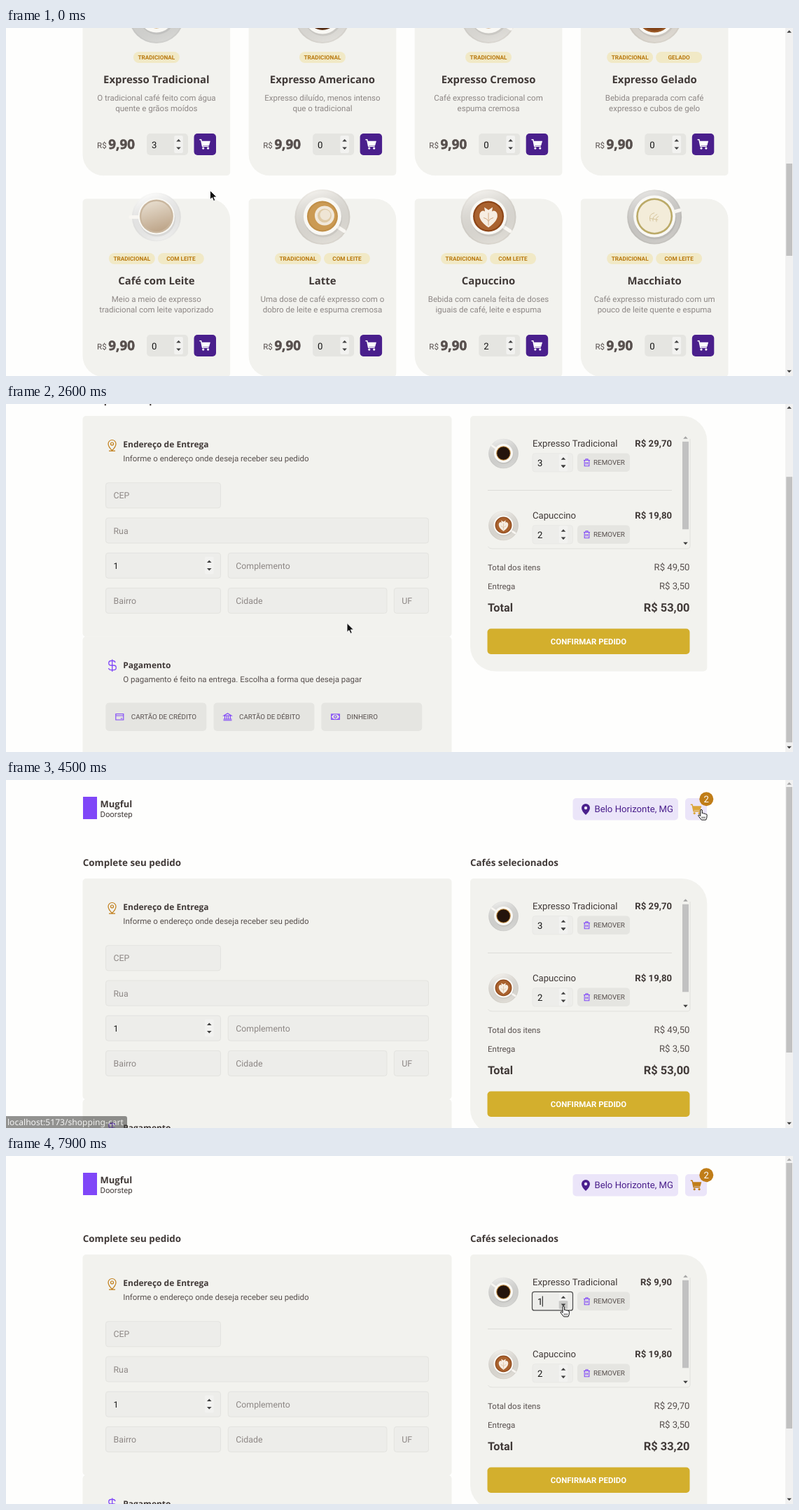
An HTML page for the animation above (8000 ms loop, 1124x498 px).

```html
<!DOCTYPE html>
<html lang="pt-BR">
<head>
<meta charset="utf-8">
<style>
html, body { margin: 0; width: 100%; height: 100%; overflow: hidden; background: #fefefd; }
svg { display: block; width: 1124px; height: 498px; font-family: Roboto, sans-serif; }
text { white-space: pre; text-rendering: geometricPrecision; }
.h { font-family: 'Open Sans', sans-serif; font-weight: 700; }
.x { stroke: currentColor; stroke-width: .6px; color: #574f4d; }
.b { font-weight: 700; }
.m { text-anchor: middle; }
.e { text-anchor: end; }
</style>
</head>
<body>
<svg id="stage" viewBox="0 0 1124 498"></svg>
<script>
const PURPLE = '#4a1f8c', VIOLET = '#8047f8', GOLD = '#c07d18', PANEL = '#f2f2ee',
      FIELD = '#ededea', BUTTON = '#e5e5e1', DARK = '#403937', TEXT = '#574f4d', LABEL = '#8d8785';

// Drawing helpers, each returns markup
const text = (x, y, str, size, fill, cls = '', id = '') =>
  `<text x="${x}" y="${y}" font-size="${size}" fill="${fill}" class="${cls}" id="${id}">${str}</text>`;
const rect = (x, y, w, h, fill, r = 5, more = '') =>
  `<rect x="${x}" y="${y}" width="${w}" height="${h}" rx="${r}" fill="${fill}" ${more}/>`;
const circle = (x, y, r, fill) => `<circle cx="${x}" cy="${y}" r="${r}" fill="${fill}"/>`;
const at = (x, y, body, more = '') => `<g transform="translate(${x} ${y})" ${more}>${body}</g>`;
const line = (d, color, w = 1.1) => `<path d="${d}" fill="none" stroke="${color}" stroke-width="${w}"/>`;
const gradient = (id, a, b) => `<linearGradient id="${id}" x1=".35" x2=".65" y2="1">
  <stop stop-color="${a}"/><stop offset="1" stop-color="${b}"/></linearGradient>`;

const leaf = (w, h, R, more = '') => `<path fill="${PANEL}" ${more} d="M5 0H${w - R}a${R} ${R} 0 0 1 ${R} ${R}V${h - 5}a5 5 0 0 1-5 5H${R}a${R} ${R} 0 0 1-${R}-${R}V5a5 5 0 0 1 5-5z"/>`;
const arrow = (x, y, dir, fill = '#404040', more = '') =>
  `<path d="M${x - 3.3} ${y - dir * 1.8}h6.6l-3.3 ${dir * 3.6}z" fill="${fill}" ${more}/>`;
const spinner = (x, y) => rect(x - 6.3, y - 12.5, 12.6, 25, '#f2f2f0', 2) + arrow(x, y - 5.7, -1) + arrow(x, y + 5.7, 1);
const cartIcon = (x, y, color, id = '') => at(x, y,
  `<path d="M.3 1.2h2.3l2 9.6h9" fill="none" stroke="currentColor" stroke-width="1.5" stroke-linejoin="round"/>
   <path d="M3 3.2h12.8l-1.7 6.3H4.3z" fill="currentColor"/>` +
  circle(5.7, 13.6, 1.6, 'currentColor') + circle(12.6, 13.6, 1.6, 'currentColor'), `color="${color}" id="${id}"`);

// Cups seen from above: plate radius, plate, edge, cup radius, coffee radius, rim, middle, handle angle, foam
const heart = '<path d="M0 15Q-16 4-12-6q3-5 7-2l-1-6 6 4 6-4-1 6q4-3 7 2Q16 4 0 15z" fill="#f6ede2"/>' +
  line('M0 12V-6M-7 1q5 1 7 5 2-4 7-5', '#d3ab86', 1);
const foam = circle(3, -2, 14, '#f1e8da') + circle(3, -2, 10, '#dfcaa6') + circle(4, -3, 7.5, '#efe5d5');
const swirl = line('M-6 6Q-9-4 0-6M-2 6Q-4 0 4-4M3 7Q1 1 6-1M-6 2l11 2', '#d6c59c', 1);
const CUPS = {
  black: [39.5, '#e4e4e1', '#dcdcd9', 25, 19, '#b98236', '#24140c', 215, ''],
  long: [39.5, '#eeece7', '#e6e3dd', 27, 21.5, '#5f3318', '#3a1f11', 160, ''],
  cream: [39.5, '#eeece7', '#e6e3dd', 26, 19, '#b27a40', '#c8955a', 30, ''],
  iced: [39.5, '#ede8e0', '#e4dfd6', 29, 25, '#9a5a28', '#824319', 330, ''],
  milk: [35, '#fdfdfc', '#f8f8f6', 26, 24, '#c9b69e', 'url(#milk)', 180, ''],
  latte: [39.5, '#eeebe4', '#e6e2da', 27, 22, '#c08f48', '#cb9a53', 33, foam],
  heart: [39.5, '#eeebe4', '#e6e2da', 26, 22, '#8d4517', '#a9622f', 33, heart],
  macchiato: [39, '#dad8d4', '#d1cfca', 30, 26, '#bbaa68', '#f3ecd9', 345, swirl],
};
const cup = (x, y, kind, s = 1) => {
  const [pr, plate, edge, cr, kr, rim, mid, angle, art] = CUPS[kind];
  return at(x, y, `<g transform="scale(${s})">` + circle(0, 0, pr, edge) + circle(0, 0, pr - 2, plate) +
    circle(0, 0, pr, 'url(#shade)') +
    `<path d="M18 0H37" stroke="#f8f6f2" stroke-width="5" stroke-linecap="round" transform="rotate(${angle})"/>` +
    circle(1, 2, cr, '#00000012') + circle(0, -1, cr, '#f9f8f4') + circle(0, -1, kr, rim) +
    circle(0, -1, kr * .9, mid) + art + '</g>');
};

const pill = (x, str) => rect(x, 77.5, 66, 16, '#f1e9c6', 8) + text(x + 33, 88.5, str, 8.23, '#b9790f', 'b m');
function card(i, [name, kind, a, b, tag, qty = 0]) {
  const x = 109.5 + i % 4 * 237.1, y = i < 4 ? -43.5 : 244.5, c = 105.35, first = i ? '' : 'hot';
  return at(x, y, `<g id="${first}">` + leaf(210.7, 254.7, 30, `id="${first}Bg"`) + cup(c, 26, kind) +
    (tag ? pill(c - 68, 'TRADICIONAL') + pill(c + 2, tag) : pill(c - 33, 'TRADICIONAL')) +
    text(c, 122, name, 14.9, DARK, 'h m') + text(c, 147.2, a, 11.52, LABEL, 'm') + text(c, 162.2, b, 11.52, LABEL, 'm') +
    text(20.6, 215.7, 'R$', 11.52, TEXT) + text(36.8, 216.5, '9,90', 18.8, TEXT, 'h x') +
    rect(91.5, 194.5, 59, 31, BUTTON) + text(98.5, 215, qty, 13.17, '#151515') + spinner(137, 210) +
    rect(159, 194.5, 31.5, 31, PURPLE, 5, `id="${first}Buy"`) + cartIcon(166.5, 202, '#fff') + '</g>');
}
const MENU = [
  ['Expresso Tradicional', 'black', 'O tradicional café feito com água', 'quente e grãos moídos', '', 3],
  ['Expresso Americano', 'long', 'Expresso diluído, menos intenso', 'que o tradicional'],
  ['Expresso Cremoso', 'cream', 'Café expresso tradicional com', 'espuma cremosa'],
  ['Expresso Gelado', 'iced', 'Bebida preparada com café', 'expresso e cubos de gelo', 'GELADO'],
  ['Café com Leite', 'milk', 'Meio a meio de expresso', 'tradicional com leite vaporizado', 'COM LEITE'],
  ['Latte', 'latte', 'Uma dose de café expresso com o', 'dobro de leite e espuma cremosa', 'COM LEITE'],
  ['Capuccino', 'heart', 'Bebida com canela feita de doses', 'iguais de café, leite e espuma', 'COM LEITE', 2],
  ['Macchiato', 'macchiato', 'Café expresso misturado com um', 'pouco de leite quente e espuma', 'COM LEITE'],
];

const field = (x, y, w, str, color = LABEL) =>
  rect(x, y, w, 36, FIELD, 3.5, 'stroke="#e3e3df"') + text(x + 11, y + 22.6, str, 12.34, color);
const section = (y, title, note) => text(167.3, y, title, 12, DARK, 'h') + text(167.3, y + 19.8, note, 11.52, TEXT);
const pay = (x, str, icon) => rect(x, 551.5, 144, 40.5, BUTTON) + at(x + 14, 566, line(icon, VIOLET)) +
  text(x + 36.5, 574.7, str, 9.8, TEXT);
const trash = line('M0 2.5h9M3 2.3V.7h3v1.6M1.2 2.5v8.3h6.6V2.5M3.4 5v3.6M5.6 5v3.6', VIOLET);

function item(y, name, kind, qty, price, id) {
  return at(0, y, cup(710.5, 195, kind, .54) + text(752, 184.6, name, 13.17, DARK) +
    text(951, 184.6, price, 13.17, DARK, 'b e', id && 'price') +
    rect(752, 194.7, 57.5, 26.3, FIELD, 3.5, 'stroke="#e6e6e2" stroke-width=".8"') + spinner(796, 207.7) +
    (id ? rect(789.7, 207.2, 12.6, 11.6, '#c9c9c7', 1, 'id="down"') + arrow(796, 213.4, 1) +
      rect(751.5, 194.3, 58, 26.6, 'none', 3, 'id="focus" stroke="#4a4a4a" stroke-width="1.2"') +
      rect(765.8, 200.5, 1, 15, '#111', 0, 'id="caret"') : '') +
    text(759, 212.5, qty, 13.17, '#151515', '', id) +
    rect(816, 194.5, 75, 26.5, BUTTON) + at(825, 202, trash) + text(839, 211.2, 'REMOVER', 9.87, TEXT));
}

const home = MENU.map((m, i) => card(i, m)).join('');
const cart =
  rect(110, 24, 20, 32, VIOLET, 0) + text(134.5, 39, 'Mugful', 13, DARK, 'h') + text(134.5, 53, 'Doorstep', 11.3, DARK) +
  rect(809.5, 26, 150.5, 31.5, '#ebe5f9') +
  `<path d="M828 34a6 6 0 0 1 6 6q0 4.5-6 10-6-5.5-6-10a6 6 0 0 1 6-6z" fill="${PURPLE}"/>` + circle(828, 40, 2.2, '#ebe5f9') +
  text(840.5, 46.2, 'Belo Horizonte, MG', 13.17, PURPLE) +
  rect(970, 26, 31, 31.5, '#ebe5f9') + cartIcon(977.5, 34, GOLD, 'basket') +
  circle(1000.3, 27.3, 10, GOLD) + text(1000.3, 32, '2', 13.17, '#fff', 'm') +
  text(109.8, 122.8, 'Complete seu pedido', 13.4, DARK, 'h') + text(663, 122.8, 'Cafés selecionados', 13.4, DARK, 'h') +
  rect(109.5, 141, 527, 316.2, PANEL) + rect(109.5, 456.8, 527, 190, PANEL) +
  line('M151.5 190.5q-5.5-5.5-5.5-9.5a5.5 5.5 0 0 1 11 0q0 4-5.5 9.5zM147 191.2h9', GOLD, 1.2) +
  `<circle cx="151.5" cy="181" r="2" fill="none" stroke="${GOLD}" stroke-width="1.2"/>` +
  section(186.4, 'Endereço de Entrega', 'Informe o endereço onde deseja receber seu pedido') +
  field(142.5, 236.8, 164, 'CEP') + field(142.5, 287, 461, 'Rua') +
  field(142.5, 337.2, 164, '1', '#151515') + spinner(290.3, 355) + field(317.3, 337.2, 286.2, 'Complemento') +
  field(142.5, 387.4, 164, 'Bairro') + field(317.3, 387.4, 226.7, 'Cidade') + field(554.3, 387.4, 49.2, 'UF') +
  line('M156 494q-.5-2.5-3-2.5h-3a3 3 0 0 0 0 6.5h4a3.3 3.3 0 0 1 0 6.6h-4q-3 0-3.5-2.6M151.7 489.5v17.5', VIOLET, 1.3) +
  section(501.8, 'Pagamento', 'O pagamento é feito na entrega. Escolha a forma que deseja pagar') +
  pay(142.3, 'CARTÃO DE CRÉDITO', 'M.5 1.5h11v8.5h-11zM.5 4h11M7.5 8h2.5') +
  pay(296.5, 'CARTÃO DE DÉBITO', 'M.5 4L6 .7 11.5 4zM2 4v5M4.7 4v5M7.3 4v5M10 4v5M0 9h12M0 10.7h12') +
  pay(450.3, 'DINHEIRO', 'M.3 1.7h11.8v7.8H.3zM.3 4.5l3-2.8M9 1.7l3 2.8M.3 6.7l3 2.8M9 9.5l3-2.8M4.3 5.6a1.8 1.8 0 1 0 3.6 0a1.8 1.8 0 1 0-3.6 0') +
  at(663, 141, leaf(338.3, 365.5, 36)) +
  line('M688.5 328q1 3 6 3h278q4.5 0 4.5-4V174', '#dededa', .9) +
  item(0, 'Expresso Tradicional', 'black', 3, '', 'qty') + item(103, 'Capuccino', 'heart', 2, 'R$ 19,80', '') +
  rect(688, 247, 263, 1, '#dddcd8', 0) +
  rect(966, 177.8, 9, 125.5, '#c1c1c1', 0) + arrow(970.5, 172, -1, '#a3a3a3') + arrow(970.5, 323.6, 1) +
  text(688, 361.7, 'Total dos itens', 11.52, TEXT) + text(976.5, 362, '', 13.17, TEXT, 'e', 'sum') +
  text(688, 388.7, 'Entrega', 11.52, TEXT) + text(976.5, 389.2, 'R$ 3,50', 13.17, TEXT, 'e') +
  text(688, 420.6, 'Total', 16.2, DARK, 'b') + text(976.5, 420.6, '', 16.46, DARK, 'b e', 'total') +
  rect(687.5, 445.5, 289, 36.5, '#d3af2d') + text(832, 467.6, 'CONFIRMAR PEDIDO', 11.45, '#fff', 'b m');

const POINTERS = {
  arrow: '<path d="M.5.5v13l3-2.7 2 4.7 2.3-1-2-4.5h4.2z" fill="#111" stroke="#fff" stroke-width=".9"/>',
  hand: '<path d="M3.8 1.5q1.2-1.5 2.5 0v4.7l1.2-.4 1.3.9 1.4-.3 1 1 1.5.1.5 1.3-.4 3.8-1.2 3H5.3L.8 9.9q-.3-1.7 1.4-1.3l1.6 1.5z" fill="#fff" stroke="#111" stroke-linejoin="round"/>' + line('M6 11v2.5M8 11v2.5M10 11v2.5', '#111', .8),
  beam: line('M-3-6q3 0 3 1.5Q0-6 3-6M0-5V5M-3 6q3 0 3-1.5Q0 6 3 6', '#222', 1.1),
};

document.getElementById('stage').innerHTML =
  `<defs>${gradient('shade', '#ffffff60', '#0000000c')}${gradient('milk', '#e6dccd', '#bda488')}</defs>
   <g id="home">${home}</g><g id="cart">${cart}</g>` +
  rect(1113, 0, 11, 498, '#f1f1f1', 0) + rect(1114.3, 0, 8.7, 380, '#c1c1c1', 0, 'id="thumb"') +
  arrow(1118.6, 5, -1, '#404040', 'id="top"') + arrow(1118.6, 491.5, 1) +
  `<g id="status"><path d="M0 481h170q3 0 3 3v14H0z" fill="#3a3a38"/>
   <text x="2" y="494" font-size="12.1" fill="#eee" style="font-family:'Noto Sans',sans-serif">localhost:5173/shopping-cart</text></g>` +
  Object.entries(POINTERS).map(([k, v]) => `<g id="${k}">${v}</g>`).join('');

// Motion tables: [time, values...]
const PATH = [[0, 291, 232], [300, 299, 229.5], [500, 299, 229.5], [700, 294, 208], [900, 288, 178], [1100, 288, 167],
  [1200, 288, 167], [1400, 285, 163], [2000, 285, 163], [2300, 350, 216], [2600, 486.5, 313], [3100, 523, 342],
  [3400, 536, 354], [3500, 536, 354], [4000, 760, 190], [4400, 988, 41.5], [4600, 988, 41.5], [5000, 900, 64],
  [5300, 832, 86], [5700, 815, 140], [6100, 792.3, 214.3], [6500, 792.3, 214.3], [6600, 791.3, 214.3]];
const KIND = [[0, 'arrow'], [900, 'hand'], [1700, 'beam'], [2600, 'arrow'], [2800, 'beam'], [3700, 'arrow'],
  [4400, 'hand'], [4700, 'arrow'], [6000, 'hand']];
const SCROLL = [[2500, 124], [2600, 124], [2700, 98], [2800, 60], [2900, 24], [3000, 4], [3100, 0]];
const GROW = [[600, 1], [700, 1.008], [800, 1.022], [900, 1.03]];
const STATUS = [[800, 0], [900, .55], [1000, 1], [2100, 1], [2200, 0], [4400, 0], [4500, .55], [4600, 1], [4900, 1], [5000, .4], [5100, 0]];

function tween(keys, t) {
  const n = keys.findIndex(k => k[0] > t);
  if (n < 0) return keys[keys.length - 1].slice(1);
  if (!n) return keys[0].slice(1);
  const a = keys[n - 1], b = keys[n], p = (t - a[0]) / (b[0] - a[0]);
  return a.slice(1).map((v, i) => v + (b[i + 1] - v) * p);
}
const step = (keys, t) => keys.filter(k => k[0] <= t).pop()[1];
const $ = id => document.getElementById(id);
const set = (id, name, value) => $(id).setAttribute(name, value);
const show = (id, on) => set(id, 'display', on ? 'inline' : 'none');
const money = v => 'R$ ' + v.toFixed(2).replace('.', ',');

function draw(t) {
  const inCart = t >= 1700, [scroll] = tween(SCROLL, t), [grow] = tween(GROW, t);
  show('home', !inCart);
  show('cart', inCart);
  set('cart', 'transform', `translate(0 ${-scroll})`);
  set('thumb', 'y', inCart ? 10 + scroll * .76 : 194);
  set('thumb', 'height', inCart ? 380 : 132);
  set('top', 'fill', inCart && scroll < 1 ? '#a3a3a3' : '#404040');

  set('hot', 'transform', `translate(105.35 127.35) scale(${grow}) translate(-105.35 -127.35)`);
  set('hotBg', 'fill', grow > 1.01 ? '#ebebea' : PANEL);
  set('hotBuy', 'fill', t >= 900 ? '#7c3aee' : PURPLE);
  set('basket', 'color', t >= 4400 && t < 4700 ? '#dba63a' : GOLD);
  set('status', 'opacity', tween(STATUS, t)[0]);

  const n = t < 6900 ? 3 : t < 7900 ? 2 : 1;
  $('qty').textContent = n;
  $('price').textContent = money(n * 9.9);
  $('sum').textContent = money((n + 2) * 9.9);
  $('total').textContent = money((n + 2) * 9.9 + 3.5);
  show('down', t >= 6000);
  show('focus', t >= 6900);
  show('caret', t >= 6900 && (t < 7400 || t >= 7900));

  const [x, y] = tween(PATH, t), kind = step(KIND, t);
  for (const k in POINTERS) show(k, k === kind);
  set(kind, 'transform', `translate(${x} ${y})`);
}

// The screen advances in tenths of a second
function tick() {
  draw(Math.floor(performance.now() % 8000 / 100) * 100);
  requestAnimationFrame(tick);
}
tick();
</script>
</body>
</html>
```
